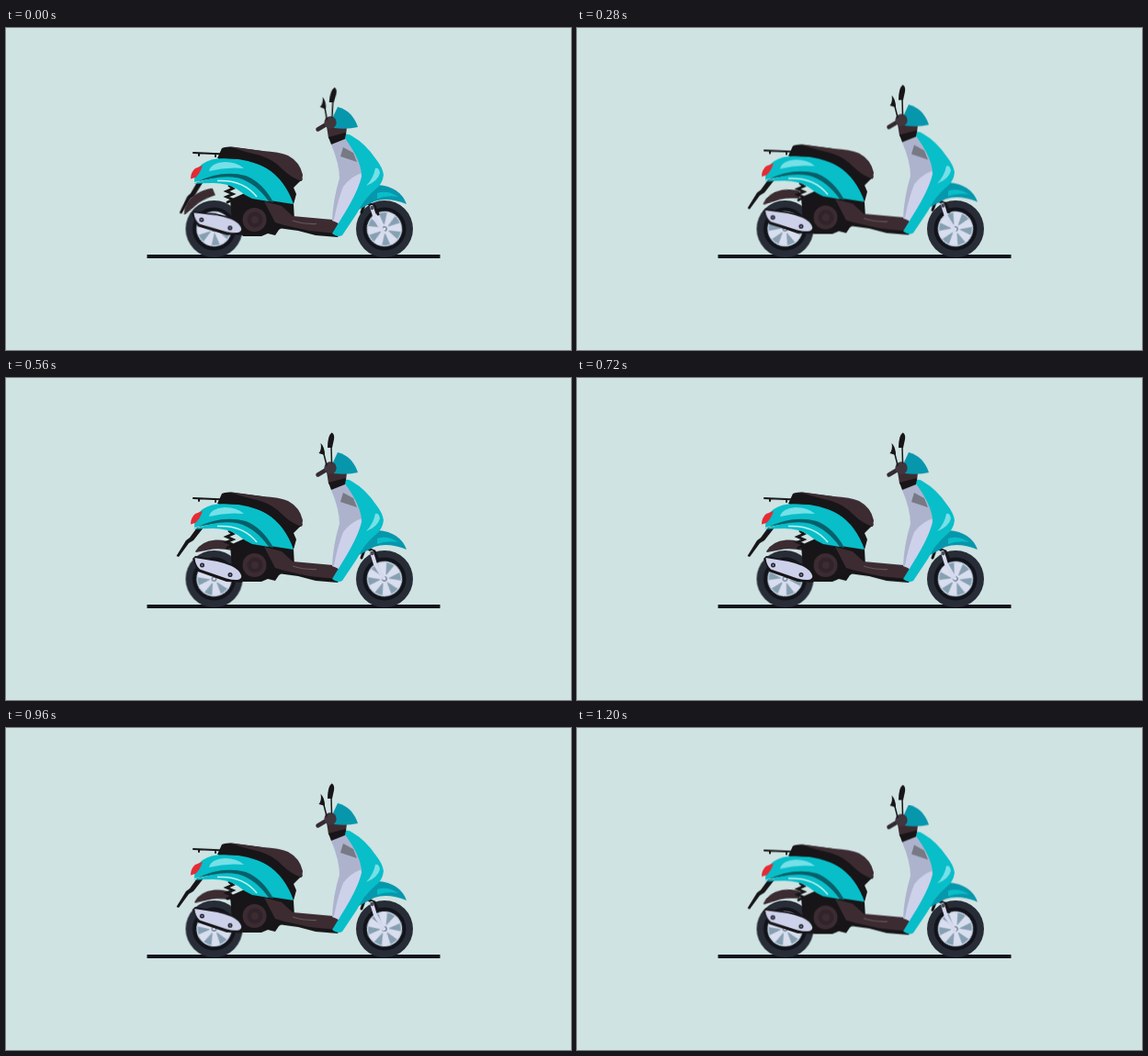
Write an HTML page that moves like this. It is 615x351 px and loops after 1.24 s.

```html
<!DOCTYPE html>
<html lang="en">
<head>
<meta charset="utf-8">
<title>Scooter</title>
<style>
  html, body { margin: 0; width: 100%; height: 100%; overflow: hidden; background: #cfe3e2; }
  svg { display: block; width: 100vw; height: 100vh; }
  .body, .guard, .plate, .mirrors, .pipe, .wheel { animation: 1240ms linear infinite; }
  .body { animation-name: bounce; }
  .guard { animation-name: swing; transform-origin: 226px 219px; }
  .plate { animation-name: droop; transform-origin: 212px 165px; }
  .mirrors { animation-name: sway; transform-origin: 352px 98px; }
  .pipe { animation-name: tilt; transform-origin: 272px 218px; }
  .wheel { animation-name: spin; }
  @keyframes bounce {
    0% { transform: translateY(5px); animation-timing-function: ease-out; }
    22.58% { transform: translateY(2.5px); }
    45.16%, 58.06% { transform: translateY(0); }
    70.97% { transform: translateY(1px); }
    87.1% { transform: translateY(.7px); }
    96.77%, 99.9% { transform: translateY(2.5px); }
    100% { transform: translateY(5px); }
  }
  @keyframes swing {
    0% { transform: rotate(-30deg); animation-timing-function: ease-out; }
    22.58% { transform: rotate(-7deg); }
    45.16%, 58.06% { transform: rotate(0); }
    70.97% { transform: rotate(-2deg); }
    87.1% { transform: rotate(-1.5deg); }
    96.77%, 99.9% { transform: rotate(-6.5deg); }
    100% { transform: rotate(-30deg); }
  }
  @keyframes droop {
    0% { transform: rotate(-6deg); animation-timing-function: ease-out; }
    22.58%, 99.9% { transform: rotate(0); }
    100% { transform: rotate(-6deg); }
  }
  @keyframes sway {
    0% { transform: rotate(4.5deg); animation-timing-function: ease-out; }
    22.58%, 99.9% { transform: rotate(0); }
    100% { transform: rotate(4.5deg); }
  }
  @keyframes tilt {
    0% { transform: translateY(2px) rotate(-3deg); animation-timing-function: ease-out; }
    22.58% { transform: translateY(1px) rotate(-1.5deg); }
    45.16%, 58.06% { transform: none; }
    70.97%, 87.1% { transform: translateY(.4px) rotate(-.6deg); }
    96.77%, 99.9% { transform: translateY(1px) rotate(-1.5deg); }
    100% { transform: translateY(2px) rotate(-3deg); }
  }
  @keyframes spin { to { transform: rotate(360deg); } }
  .black { fill: #171517; }
  .brown { fill: #3c2c32; }
  .cyan { fill: #08bec9; }
  .teal { fill: #0797ac; }
  .shine { fill: #76e0e7; }
  .pale { fill: #cdd1ea; }
  .line { fill: none; stroke: #171517; stroke-linecap: round; }
</style>
</head>
<body>
<svg viewBox="0 0 615 351" preserveAspectRatio="none">
  <defs>
    <path id="spoke" d="M-2-4L-4.8-17.500Q0-18.800 4.800-17.500L2-4Z" fill="#d9deef"/>
    <g id="wheel">
      <circle r="31" fill="#272c36"/>
      <circle r="23.5" fill="#12141b"/>
      <g class="wheel">
        <circle r="18.500" fill="#86a0b2" stroke="#c3d0e0" stroke-width="1.500"/>
        <use href="#spoke"/>
        <use href="#spoke" transform="rotate(60)"/>
        <use href="#spoke" transform="rotate(120)"/>
        <use href="#spoke" transform="rotate(180)"/>
        <use href="#spoke" transform="rotate(240)"/>
        <use href="#spoke" transform="rotate(300)"/>
        <circle r="5" fill="#d9deef"/>
        <circle r="3" fill="#7d8fa3"/>
        <circle r="1.300" fill="#eef0f8"/>
      </g>
    </g>
  </defs>

  <rect width="615" height="351" fill="#cfe3e2"/>
  <rect x="153.5" y="247" width="319" height="4" fill="#11131c"/>

  <g class="body">
    <path class="plate black" d="M185.500 194L196 177L200 174L208 163L215 163L204 177L199 180L188 195Z"/>
  </g>
  <path class="guard brown" d="M206 189Q212 178 228 176.500Q239 176 247 180L246 188Q231 185 220 187.500L207 190Z"/>

  <use href="#wheel" x="226.5" y="219"/>
  <use href="#wheel" x="412" y="219"/>

  <g class="body">
    <!-- rear rack and shock -->
    <path class="line" stroke-width="2" d="M204 131L238 132.500M210 131.500V134M228 132.500V135"/>
    <path class="line" stroke-width="2.800" d="M243 167L247 170L240 173L247 176L240 179L247 182L241 185"/>

    <!-- engine and frame -->
    <path class="black" d="M244 182L262 174L290 182L305 197L303 211L297 215L293 221L285 219L278 222H258L246 208Z"/>
    <path class="black" d="M231 137L262 131L322 160L313 169L316 176L313 187L314 205L296 202L270 182L245 160Z"/>
    <circle class="brown" cx="270.500" cy="204" r="13"/>
    <circle cx="271" cy="204" r="8.500" fill="#30232a"/>
    <circle class="brown" cx="271" cy="204" r="4"/>
    <path class="line" stroke-width="2.500" d="M283 216Q291 221 296 211"/>

    <!-- floorboard -->
    <path class="black" d="M293 206L315 211L356 215L364 218L361 223L337 221L318 216L296 213Z"/>
    <path class="brown" d="M281 184L300 189L312 200L356 204L363 209L360 219L330 216L303 210L293 207Z"/>
    <path d="M312 205Q324 209 338 208.500" fill="none" stroke="#67575e" stroke-width="1.200"/>

    <!-- rear cover -->
    <path class="cyan" d="M205 163Q205 149 214 143Q224 136 240 137Q267 138 284 148Q304 161 313 187L287 183Q272 162 246 157Q225 156 205 163Z"/>
    <path fill="#075f69" d="M207 163Q235 149 261 156Q279 163 291 185L282 183Q263 160 244 159Q225 158 207 163Z"/>
    <path class="cyan" d="M204 165Q232 154 253 158.500Q272 164 286 184L268 181Q259 177 252 171Q241 164 226 164Q214 164 204 165Z"/>
    <path d="M230 161.500Q258 160 273 179" fill="none" stroke="#c9f3f4" stroke-width="1.500"/>
    <path class="shine" d="M221 151Q223 142 238 141Q251 141 259 148Q240 146 221 151Z"/>
    <path fill="#e52b35" d="M201 159.500Q201 152 206 148L214 145Q211 154 206 158Z"/>

    <!-- seat -->
    <path class="black" d="M230 137L235 126Q238 124 246 124.500L279 129L307 136L323 160Q315 167 302 161Q282 143 258 138Z"/>
    <path class="brown" d="M243 124.500L279 129Q298 130 307 134Q320 141 323 155L322 162Q310 158 301 149Q292 139 277 134Q260 130 243 124.500Z"/>

    <!-- front fork and fender -->
    <path class="line" stroke-width="3" d="M387 196L391 185L401 189L405 198"/>
    <path d="M398 190L402 203L411 218" fill="none" stroke="#d5d9ee" stroke-width="4" stroke-linecap="round"/>
    <circle cx="398.500" cy="191" r="2.200" fill="#4b4c5a"/>
    <path class="teal" d="M391 173L405 166Q429 168 436 187Q416 179 401 184L384 193Z"/>
    <path class="cyan" d="M404 175Q415 171 427 179Q414 177 404 181Z"/>

    <!-- leg shield -->
    <path class="pale" d="M354 122L369 115Q388 133 390 151Q388 173 363 208L355 205Q356 182 363 159Q363 143 354 122Z"/>
    <path fill="#aeb3cd" d="M354 122L369 115Q385 133 387 153Q374 158 367 168Q361 183 357 204L355 205Q356 182 363 159Q363 143 354 122Z"/>
    <path fill="#777985" d="M367 125L378 131L382 141L364 135Z"/>
    <path class="cyan" d="M368 114Q370 108 377 113Q391 121 402 137Q410 147 411 155Q410 165 402 171Q390 181 382 197L366 221Q361 224 355 219L366 201Q383 174 387 157Q387 139 368 114Z"/>
    <path class="shine" d="M402 148Q406 147 407 153Q405 162 392 167Q400 159 402 148Z"/>

    <!-- steering head -->
    <path class="brown" d="M349 102L371 103L370 112L355 118L351 115Z"/>
    <path class="black" d="M351 114L370 109L369 116L354 122Z"/>
    <path class="teal" d="M361 81Q377 85 383 103Q371 106 357 104L355 94Z"/>
    <path d="M339.500 105.500L347 101" stroke="#342a30" stroke-width="4.500" stroke-linecap="round"/>
    <circle cx="353" cy="98" r="6.700" fill="#40363d"/>
    <g class="mirrors">
      <path class="line" stroke-width="1.500" d="M349 95L345.500 81M354.500 92L354 74"/>
      <path class="black" d="M354.500 59.500Q358 61 357 67L355 76L350 76Q350 63 354.500 59.500Z"/>
      <path class="black" d="M342.500 71Q347 75 347 84L340.500 82Q344 78 342.500 71Z"/>
    </g>
  </g>

  <!-- exhaust -->
  <g class="pipe">
    <path class="black" d="M203 197L206 194L231 198.500L250 204L260 217L257 223L240 222L209 211Z"/>
    <path class="pale" d="M205.500 196L230 200Q247 204 253 210Q259 217 254 219.500Q249 221 240 218.500L211 208.500Q206 204 205.500 196Z"/>
    <circle cx="213.500" cy="204" r="2.500" fill="#22232d"/>
    <circle cx="244" cy="214.500" r="2.500" fill="#22232d"/>
    <circle cx="213.500" cy="204" r="1" fill="#8b91aa"/>
    <circle cx="244" cy="214.500" r="1" fill="#8b91aa"/>
  </g>
</svg>
</body>
</html>
```
